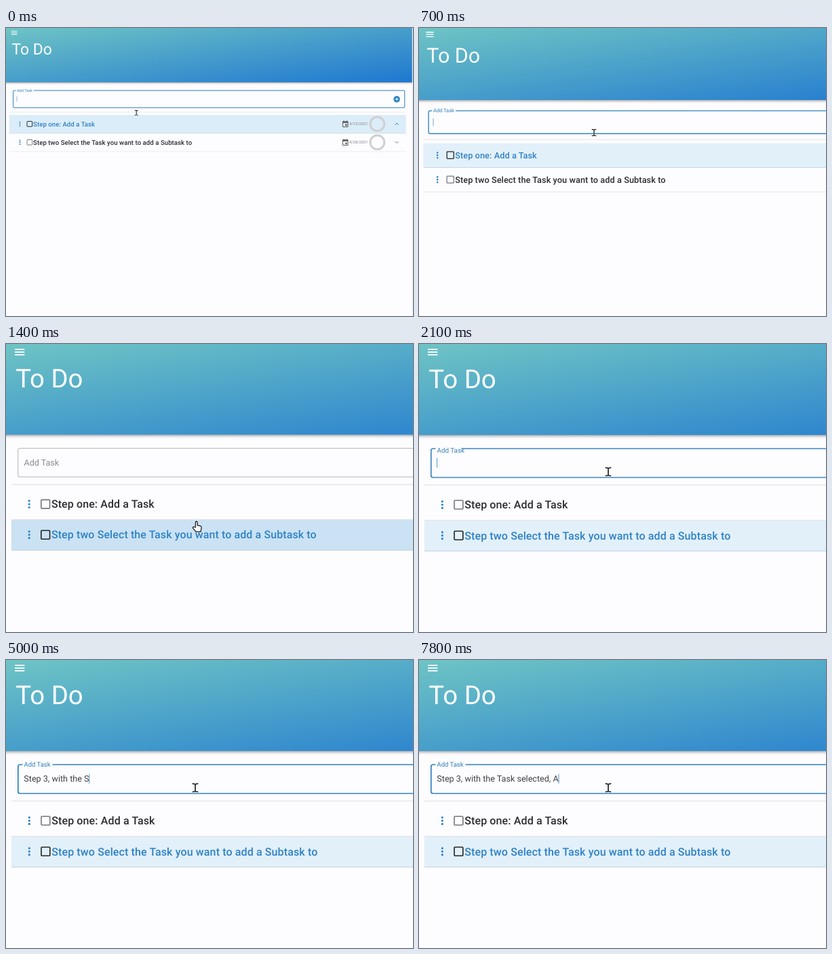
Write an HTML page that moves like this. It is 600 by 424 pixels and loops after 8 s.

```html
<!DOCTYPE html>
<html lang="en">
<head>
<meta charset="utf-8">
<title>To Do</title>
<style>
html, body { margin: 0; width: 100%; height: 100%; overflow: hidden; background: #fdfcfe; }
svg { display: block; width: 600px; height: 424px; }
text { font-family: Roboto, Arial, sans-serif; white-space: pre; text-rendering: geometricPrecision; }
.task { font-size: 16px; font-weight: 500; letter-spacing: .0075em; }
.date { font-size: 9.6px; fill: #858589; }
.icon { fill: none; stroke-width: 1.6; }
#bar { filter: drop-shadow(0 1px 2.5px rgba(0, 0, 0, .5)); }
</style>
</head>
<body>
<svg viewBox="0 0 600 424">
  <defs>
    <linearGradient id="sky" x1="0" y1="0" x2="1" y2="1">
      <stop stop-color="#6ec4c4"/><stop offset="1" stop-color="#1f77d1"/>
    </linearGradient>
    <clipPath id="rowClip"><rect x="8" y="260" width="980" height="44.5"/></clipPath>
  </defs>
  <g id="page">
    <rect id="bar" x="-9" y="-9" width="1012.5" height="142.8" fill="#4aa0cb"/>
    <rect width="1003.5" height="133.8" fill="url(#sky)"/>
    <rect x="1003.5" width="8" height="720" fill="#f8f8f9"/>
    <path d="M1003.5 0V720" stroke="#e3e3e5"/>
    <path d="M13 7.9H27.4M13 11.9H27.4M13 15.9H27.4" stroke="#fff" stroke-width="1.6"/>
    <text x="14.2" y="64.7" font-size="38.4" fill="#fff">To Do</text>

    <path id="border" fill="none"/>
    <text id="label" x="26.6">Add Task</text>
    <text id="entry" x="26.3" y="179.3" font-size="12.6" fill="#404044"></text>
    <path id="caret" stroke="#3d8fc0" stroke-width=".9"/>
    <circle cx="965" cy="175.5" r="8" fill="#2e82c6"/>
    <path d="M961 175.5H969M965 171.5V179.5" stroke="#fff" stroke-width="1.6"/>

    <path d="M8 207.6H988" stroke="#e4e3e6" stroke-width="1.2"/>
    <g id="rows"></g>
    <circle id="ripple" cx="336" cy="262" fill="#8c8b8f" clip-path="url(#rowClip)"/>
    <g id="content"></g>

    <g id="cursor" stroke-linejoin="round" stroke-linecap="round">
      <g id="beam" fill="none">
        <path d="M-3.6-5.8Q-.6-5.8 0-4.6Q.6-5.8 3.6-5.8M0-4.6V4.8M-3.6 6Q-.6 6 0 4.8Q.6 6 3.6 6" stroke="#fff" stroke-width="3" opacity=".6"/>
        <path d="M-3.6-5.8Q-.6-5.8 0-4.6Q.6-5.8 3.6-5.8M0-4.6V4.8M-3.6 6Q-.6 6 0 4.8Q.6 6 3.6 6" stroke="#222" stroke-width="1.7"/>
      </g>
      <path id="hand" d="M-1.6 1.5V-6.2Q-.2-8.4 1.2-6.2V-1.5L5.8-.6Q7.4 0 7.2 2L6 7.8H-1L-5.6 2.4Q-5.8 .4-3.6 .8Z" fill="#fff" stroke="#222" stroke-width="1.3"/>
    </g>
  </g>
</svg>
<script>
const $ = id => document.getElementById(id);
const set = (el, attrs) => { for (const k in attrs) el.setAttribute(k, attrs[k]); };
const clamp = u => Math.max(0, Math.min(1, u));
const ramp = (t, from, to) => clamp((t - from) / (to - from));
const mix = (a, b, u) => `rgb(${a.map((v, i) => Math.round(v + (b[i] - v) * u))})`;

const LOOP = 8000, BLUE = '#2e82c6', DARK = '#2c2c30';
const PALE = [226, 240, 250], TINT = [219, 237, 248], HOVER = [202, 226, 243];
const EVENT = 'M17 12h-5v5h5zM16 1v2H8V1H6v2H5a2 2 0 0 0-2 2v14a2 2 0 0 0 2 2h14a2 2 0 0 0 2-2V5a2 2 0 0 0-2-2h-1V1zm3 18H5V8h14z';

// Each run types one character per step; "<" deletes one.
const runs = [
  [2800, 'Step '], [3400, '3'], [3600, ', with the ', 80], [4700, 'S'], [5100, '<'],
  [5300, 'Task s'], [6000, 'e'], [6500, 'le'], [6800, 'cted, '], [7800, 'A']
];
// time, x, y
const path = [[0, 322, 209], [700, 326, 194.5], [1000, 282, 269.5], [1500, 282, 269.5], [1900, 279, 188], [LOOP, 279, 188]];

const rows = [
  { y: 236.6, bottom: 259.6, text: 'Step one: Add a Task', date: '4/13/2021' },
  { y: 281.9, bottom: 304.8, text: 'Step two Select the Task you want to add a Subtask to', date: '4/28/2021' }
];
rows.forEach((r, i) => {
  const top = i ? 260 : 214.4;
  $('rows').insertAdjacentHTML('beforeend',
    `<rect x="8" y="${top}" width="980" height="${r.bottom - top}"/>
     <path d="M8 ${r.bottom}H988" stroke="#c9d3dc" stroke-width="1"/>`);
  $('content').insertAdjacentHTML('beforeend', `<g transform="translate(0 ${r.y})">
    ${[-4.8, 0, 4.8].map(y => `<circle cx="34.3" cy="${y}" r="1.6" fill="${BLUE}"/>`).join('')}
    <rect class="icon box" x="52" y="-6.4" width="12.8" height="12.8" rx="1"/>
    <text class="task" x="67.2" y="5.6">${r.text}</text>
    <path d="${EVENT}" transform="translate(828.4 -9) scale(.8)" fill="#555"/>
    <text class="date" x="848" y="2.9">${r.date}</text>
    <circle class="icon" cx="917" r="17.3" style="stroke:#cfcfd1;stroke-width:5"/>
    <path class="icon chevron"/></g>`);
  r.fill = $('rows').children[i * 2];
  r.line = $('rows').children[i * 2 + 1];
  const part = s => $('content').children[i].querySelector(s);
  Object.assign(r, { box: part('.box'), task: part('.task'), chevron: part('.chevron') });
});

function typed(t) {
  let s = '';
  for (const [start, text, step = 100] of runs)
    [...text].forEach((c, i) => {
      if (t >= start + i * step) s = c === '<' ? s.slice(0, -1) : s + c;
    });
  return s;
}

function drawField(t) {
  const focus = t < 1050 || t >= 2000;
  const s = t < 2000 ? 1 - ramp(t, 1000, 1170) : ramp(t, 1950, 2120);
  const notch = 24.5 + 44 * s;
  set($('border'), {
    d: `M${notch} 154H981.5a3 3 0 0 1 3 3V193.5a3 3 0 0 1-3 3H20.8a3 3 0 0 1-3-3V157a3 3 0 0 1 3-3H24.5`,
    stroke: mix([184, 184, 187], [46, 130, 190], s), 'stroke-width': focus ? 1.7 : 1.1
  });
  set($('label'), {
    y: 179.6 - 22.5 * s, 'font-size': 12.6 - 3.15 * s, fill: mix([138, 138, 141], [46, 130, 190], s)
  });
  const entry = $('entry'), text = typed(t);
  entry.textContent = text;
  const x = 26.6 + (text ? entry.getComputedTextLength() : 0);
  const blink = (t >= 6300 && t < 6500) || (t >= 7600 && t < 7800);
  set($('caret'), { d: `M${x} 168V182`, opacity: focus && !blink ? 1 : 0 });
}

function drawRows(t) {
  const active = t < 1200 ? 0 : 1;
  rows.forEach((r, i) => {
    const on = i === active;
    let fill = 'none';
    if (on) fill = i ? mix(HOVER, PALE, ramp(t, 1500, 1800)) : mix(TINT, PALE, ramp(t, 0, 500));
    else if (i && t >= 1000) fill = '#e9e9ea';
    set(r.fill, { fill });
    set(r.line, { stroke: on ? '#bfd0dd' : '#dfdfe2' });
    set(r.box, { stroke: on ? '#222' : '#77777a' });
    set(r.task, { fill: on ? BLUE : DARK });
    const d = on ? -1 : 1;
    set(r.chevron, { d: `M960.8 ${-2.2 * d}L965 ${2.2 * d}L969.2 ${-2.2 * d}`, stroke: on ? BLUE : '#77777a' });
  });
  const grow = t - 1000;
  set($('ripple'), { r: Math.max(0, 2.41 * grow), opacity: .52 * (1 - ramp(t, 1100, 1400)) });
}

function drawCursor(t) {
  const i = path.findIndex(p => p[0] > t);
  const [t0, x0, y0] = path[i - 1], [t1, x1, y1] = path[i];
  const u = ramp(t, t0, t1), e = u * u * (3 - 2 * u);
  const y = y0 + (y1 - y0) * e, hand = y > 214;
  set($('cursor'), { transform: `translate(${x0 + (x1 - x0) * e} ${y})` });
  set($('hand'), { opacity: +hand });
  set($('beam'), { opacity: +!hand });
}

function draw(now) {
  const t = Math.floor(now % LOOP / 100) * 100;
  const ease = (1 - Math.cos(Math.PI * ramp(t, -65, 1495))) / 2;
  set($('page'), { transform: `scale(${(1 + .68 * ease) / 1.68})` });
  drawField(t);
  drawRows(t);
  drawCursor(t);
}

const start = performance.now();
function tick() {
  draw(performance.now() - start);
  requestAnimationFrame(tick);
}
tick();
</script>
</body>
</html>
```
